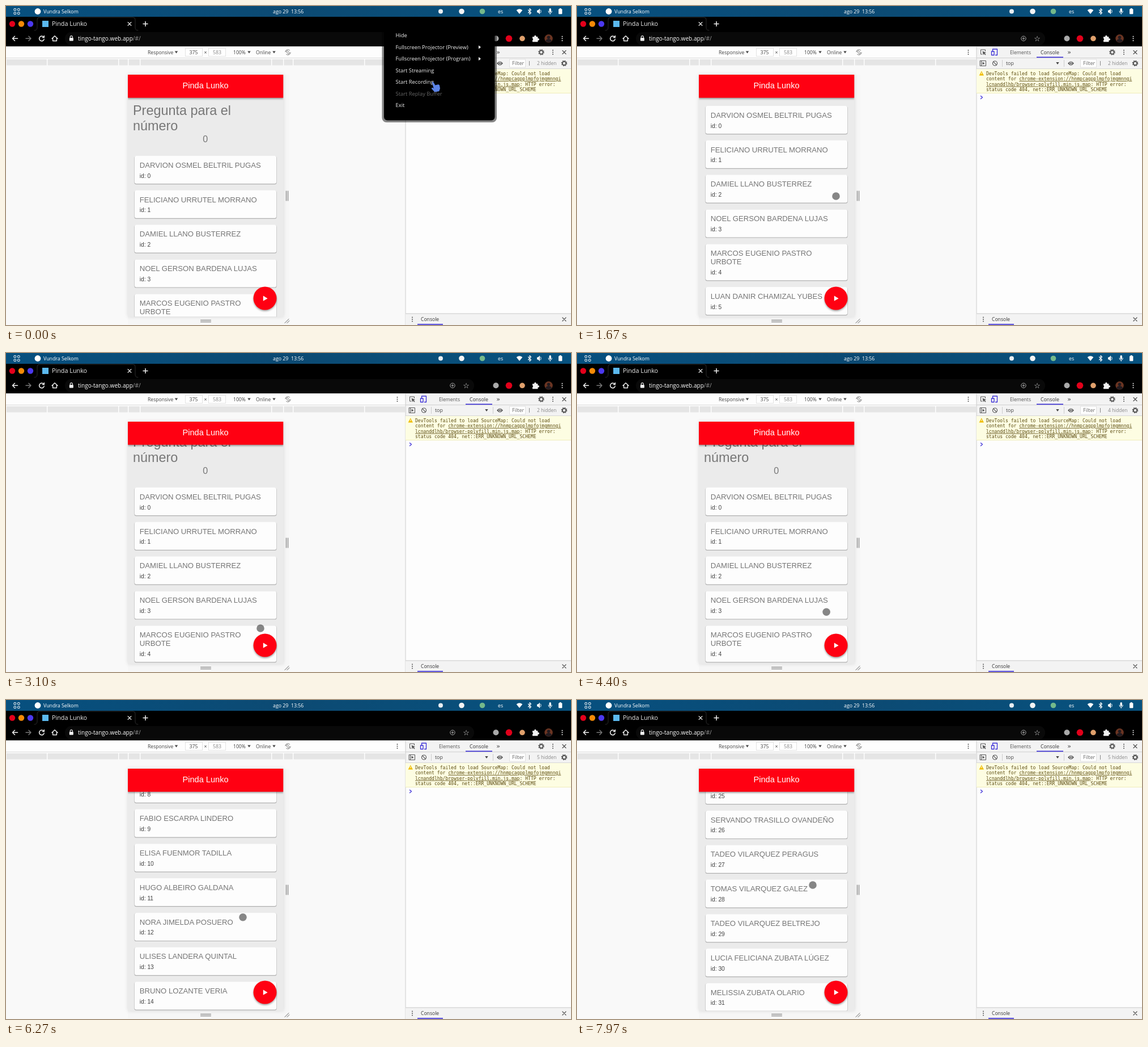
Write an HTML page that moves like this. It is 997 by 562 pixels and loops after 8000 ms.

```html
<!DOCTYPE html>
<html lang="es">
<head>
<meta charset="utf-8">
<style>
  html, body { margin: 0; width: 100%; height: 100%; overflow: hidden; background: #fdfdfd; }
  svg { display: block; width: 997px; height: 562px; }
  text { font-family: "Open Sans", "Noto Sans", sans-serif; white-space: pre; }
  .app text { font-family: "Liberation Sans", Arial, sans-serif; }
  .mono text { font-family: "DejaVu Sans Mono", monospace; }
  .glyph { font-family: "DejaVu Sans", sans-serif; text-anchor: middle; dominant-baseline: central; }
  .line { fill: none; stroke-linecap: round; stroke-linejoin: round; }
</style>
</head>
<body>
<svg id="stage" viewBox="0 0 997 562"></svg>
<script>
const LOOP = 8000;
const text = (x, y, size, str, fill, attrs = '') =>
  `<text x="${x}" y="${y}" font-size="${size}" fill="${fill}" ${attrs}>${str}</text>`;
const glyph = (x, y, size, str, fill) => text(x, y, size, str, fill, 'class="glyph"');
const rect = (x, y, w, h, fill, attrs = '') =>
  `<rect x="${x}" y="${y}" width="${w}" height="${h}" fill="${fill}" ${attrs}/>`;
const dot = (x, y, r, fill, attrs = '') => `<circle cx="${x}" cy="${y}" r="${r}" fill="${fill}" ${attrs}/>`;
const path = (d, fill) => `<path d="${d}" fill="${fill}"/>`;
const line = (d, stroke, width = 1) => `<path class="line" d="${d}" stroke="${stroke}" stroke-width="${width}"/>`;
const caret = (x, y, fill = '#444') => path(`M${x - 2.7} ${y - 2}h5.4l-2.7 4z`, fill);
const dots = (x, y, fill) => [-3.6, 0, 3.6].map(d => dot(x, y + d, 1, fill)).join('');
const cross = (x, y, r, stroke) =>
  line(`M${x - r} ${y - r}l${2 * r} ${2 * r}m0 ${-2 * r}l${-2 * r} ${2 * r}`, stroke, 1.3);
const gear = (x, y) => dot(x, y, 3.2, 'none', 'stroke="#555" stroke-width="2"') +
  dot(x, y, 4.7, 'none', 'stroke="#555" stroke-width="1.3" stroke-dasharray="1.85 1.84"');

// ---- Player list -------------------------------------------------------
const names = [
  'DARVION OSMEL BELTRIL PUGAS', 'FELICIANO URRUTEL MORRANO', 'DAMIEL LLANO BUSTERREZ',
  'NOEL GERSON BARDENA LUJAS', 'MARCOS EUGENIO PASTRO|URBOTE', 'LUAN DANIR CHAMIZAL YUBES',
  'RAUL FERMIN CÁRBOL BERMIO', 'EDIVER MELGADE VILÁRQUEZ', 'OLIVIA DORANTE MESUL',
  'FABIO ESCARPA LINDERO', 'ELISA FUENMOR TADILLA', 'HUGO ALBEIRO GALDANA',
  'NORA JIMELDA POSUERO', 'ULISES LANDERA QUINTAL', 'BRUNO LOZANTE VERIA',
  'IRENE MARULO CIFUELA', 'TOBIAS MESANZA ROLDUN', 'CAMILA MOLGUERA DIAL',
  'RUBEN NOVARTE OLIVAL', 'FLORENTINA UZA BALMÍREZ', 'LUAN PEDRO TAMARIZ TAMARIZ',
  'ERNESTO BELTREJO MANTUYA', 'LUAN PEDRO RIZO MARDENA', 'SHEIDRY SALOBRIA FERRUELA',
  'TOMAS PEPULANDA SALTUAR', 'LUISA FERNELIA TOBARES LEDÓN', 'SERVANDO TRASILLO OVANDEÑO',
  'TADEO VILARQUEZ PERAGUS', 'TOMAS VILARQUEZ GALEZ', 'TADEO VILARQUEZ BELTREJO',
  'LUCIA FELICIANA ZUBATA LÚGEZ', 'MELISSIA ZUBATA OLARIO'
];
const PITCH = 60.8, LINE = 15.1;

function playerCards() {
  let top = 264;
  return names.map((name, id) => {
    const lines = name.split('|'), extra = (lines.length - 1) * LINE, height = 49 + extra;
    const card = rect(226.5, top + .4, 251, height + .8, '#000', 'rx="3.2" opacity=".25"') +
      rect(227, top, 250, height, '#fdfdfd', 'rx="3"') +
      lines.map((s, i) => text(235.8, top + 20.7 + i * LINE, 13.15, s, '#757575')).join('') +
      text(235.8, top + 38.5 + extra, 10.23, 'id: ' + id, '#404040');
    top += PITCH + extra;
    return card;
  }).join('');
}

// ---- Static parts ------------------------------------------------------
function systemBar() {
  const squares = [[14, 4.5], [20.5, 4.5], [14, 11], [20.5, 11]]
    .map(([x, y]) => rect(x, y, 3.6, 3.6, 'none', 'stroke="#fff" rx=".8"')).join('');
  return rect(0, 0, 997, 19, 'url(#bar)') + squares + dot(56, 9.5, 5.4, '#fff') +
    text(66, 12.6, 8.8, 'Vundra Selkom', '#fff') +
    text(471, 12.6, 8.8, 'ago 29\u00a0\u00a013:56', '#fff') +
    dot(767, 9.5, 4, '#e8eef2') + dot(804, 9.5, 4.8, '#f4f4f4') + dot(840.5, 9.5, 4.8, '#74b98b') +
    text(868, 12.6, 8.8, 'es', '#fff') +
    path('M900.7 7.5Q906 3 911.3 7.5L906 14z', '#fff') +
    line('M921.5 7l5 5-2.5 2.5v-10l2.5 2.5-5 5', '#fff', 1.1) +
    path('M937 7.6h2l3-3v10l-3-3h-2z', '#fff') + line('M943.5 7q1.5 2.5 0 5', '#fff') +
    rect(958.5, 4, 3.4, 7, '#fff', 'rx="1.7"') + line('M957 9q0 3.5 3.2 3.5t3.2-3.5M960.2 12.5v2', '#fff') +
    rect(975, 5.3, 6.4, 9, '#fff', 'rx="1"') + rect(976.8, 4, 2.8, 2, '#fff');
}

function browserBar() {
  const W = '#f2f2f2';
  return rect(0, 19, 997, 52.5, '#000') +
    line('M50 43q5 0 5-5V24q0-4 4-4h165q4 0 4 4v14q0 5 5 5', '#2b2b2b') +
    dot(11, 31.5, 5.2, '#e5001b') + dot(27, 31.5, 5.2, '#f58a07') + dot(43, 31.5, 5.2, '#4b38f0') +
    rect(64, 26, 11, 11, '#5bb8ee') + text(81, 35.2, 10.8, 'Pinda Lunko', '#eee') +
    cross(218, 31.5, 2.9, W) + line('M242 31.5h8M246 27.5v8', W, 1.5) +
    rect(104, 46, 722, 23, '#090909', 'rx="11"') +
    line('M20.5 57.3h-9m4-4l-4 4 4 4', W, 1.5) + line('M35 57.3h9m-4-4l4 4-4 4', '#777', 1.5) +
    line('M66.2 54.5a4.3 4.3 0 1 0 1 3.8M67.3 52.5v3h-3', W, 1.5) +
    line('M81 57.5l5-4.8 5 4.8M82.6 56.5v5h6.8v-5', W, 1.4) +
    rect(111.8, 56, 7, 5.4, W, 'rx="1"') + line('M113.3 56v-1.4a2 2 0 0 1 4 0V56', W, 1.1) +
    text(127, 60.8, 10.05, 'tingo-tango.web.app<tspan fill="#999">/#/</tspan>', '#fff') +
    dot(788, 57.3, 4.2, 'none', 'stroke="#aaa"') + line('M786 57.3h4m-2-2v4', '#aaa') +
    glyph(812, 57, 13, '☆', '#eee') +
    dot(864.5, 57.3, 5, '#aaa') + dot(887.5, 57.3, 5.8, '#e2001a') + dot(911, 57.3, 4.8, '#e0a06c') +
    path('M929 54.2h3.2a1.8 1.8 0 1 1 3.4 0h2.9v3a1.8 1.8 0 1 1 0 3.3v2.7h-9.5v-3a1.8 1.8 0 0 0 0-3.3z', W) +
    dot(957.5, 57.3, 7.2, '#6b3522') + path('M952 62q1-4 5.5-4t5.5 4q-5 4-11 0z', '#211b20') +
    dot(957.5, 55.3, 2.7, '#211b20') + dots(981.5, 57.3, W);
}

function deviceArea() {
  const ticks = [72, 198, 215, 236, 468, 489, 506, 632].map(x => rect(x, 93, 1.4, 12, '#fff')).join('');
  const D = '#444';
  return rect(0, 71.5, 705, 490.5, '#f9f9f9') + rect(0, 71.5, 705, 19.5, '#fdfdfd') +
    rect(0, 91, 705, 1, '#ddd') + rect(1, 94, 703, 10.5, '#e5e5e5') + ticks +
    text(250, 84.8, 8.6, 'Responsive', D) + caret(300.5, 81.5) +
    rect(316.5, 74.5, 30, 14, '#fff', 'stroke="#e2e2e2"') + text(323.5, 84.8, 8.8, '375', D) +
    text(349.5, 84.8, 8.8, '×', D) +
    rect(357.5, 74.5, 30, 14, '#fff', 'stroke="#e2e2e2"') + text(365, 84.8, 8.8, '583', '#888') +
    text(401, 84.8, 8.6, '100%', D) + caret(429, 81.5) +
    text(441, 84.8, 8.6, 'Online', D) + caret(473, 81.5) +
    dot(497.5, 81.5, 4.6, 'none', 'stroke="#777" stroke-dasharray="10.5 4"') +
    line('M494.6 80l1.6-1.6 4.2 4.4-1.6 1.6z', '#666') + dots(690.5, 81.5, '#555') +
    rect(489.5, 121, 10, 440, '#f6f6f6') + rect(215, 547.5, 284, 13.5, '#f6f6f6') +
    line('M494.5 326v17M497.5 326v17M343.5 553.5h18M343.5 556.5h18M492 558.5l7-7M496 558.5l4-4', '#666');
}

function devTools() {
  const D = '#444', M = '#5c4b10';
  const log = ['DevTools failed to load SourceMap: Could not load',
    'content for <tspan text-decoration="underline">chrome-extension://hnmpcagpplmpfojmgmnngi</tspan>',
    '<tspan text-decoration="underline">lcnanddlhb/browser-polyfill.min.js.map</tspan>: HTTP error:',
    'status code 404, net::ERR_UNKNOWN_URL_SCHEME'];
  return rect(704.5, 71.5, 292.5, 490.5, '#fdfdfd') + rect(705, 71.5, 292, 39, '#f3f3f3') +
    rect(705, 91, 292, 1, '#d0d0d0') + rect(705, 110, 292, 1, '#d8d8d8') + rect(704.5, 71.5, 1, 490.5, '#ccc') +
    line('M715 85h-2.5v-8h8v2.5', '#555') + path('M715.5 79.5l6.5 2.7-2.6 1 2.2 2.4-1.1 1-2.3-2.4-1.2 2.3z', '#555') +
    line('M733.5 80v-4h8v10.5h-3M731.5 80h4.5v6.5h-4.5z', '#3c30d8', 1.3) +
    text(764, 84.8, 8.6, 'Elements', '#555') + text(818, 84.8, 8.8, 'Console', '#333') +
    rect(811, 89.5, 47, 1.6, '#3c30d8') + glyph(868.5, 81, 11, '»', D) +
    gear(944.5, 81.5) + dots(965, 81.5, '#555') + cross(985, 81.5, 3, '#555') +
    line('M711.5 96.5h10v9h-10zM713.5 96.5v9', '#555') + path('M715.5 98.5l4 2.5-4 2.5z', '#555') +
    dot(737.5, 101, 4, 'none', 'stroke="#555" stroke-width="1.2"') + line('M734.8 98.2l5.4 5.6', '#555', 1.2) +
    rect(750, 95, 1, 12, '#ccc') + text(757, 104.3, 8.8, 'top', D) + caret(848, 101) +
    rect(859, 95, 1, 12, '#ccc') +
    path('M866 101q5.5-7 11 0-5.5 7-11 0z', '#555') + dot(871.5, 101, 2.4, '#f3f3f3') + dot(871.5, 101, 1.4, '#555') +
    rect(888.5, 94, 28, 14, '#fff', 'stroke="#e0e0e0"') + text(893, 104.3, 9, 'Filter', '#666') +
    rect(923, 97, 1, 8, '#888') +
    text(937, 104.3, 8.4, '<tspan id="hidden">2</tspan> hidden', '#888') + gear(985, 101) +
    rect(705, 111, 292, 42, '#fdfde2') + rect(705, 153, 292, 1, '#f0eebb') +
    path('M713.8 114.5l4.2 8h-8.4z', '#f0bd00') + rect(713.3, 117, 1, 3, '#fff') +
    `<g class="mono">${log.map((s, i) => text(722, 121.7 + i * 9.5, 8.07, s, M)).join('')}</g>` +
    line('M712.5 158.5l3 2.5-3 2.5', '#3c30d8', 1.3) +
    rect(705, 541.5, 292, 20.5, '#f3f3f3') + rect(705, 541.5, 292, 1, '#ccc') +
    dots(717, 552, '#555') + text(732, 555.3, 8.6, 'Console', '#333') +
    rect(726, 560, 45, 1.6, '#3c30d8') + cross(985, 552, 3, '#555');
}

function phone() {
  return `<g class="app">${rect(215, 121, 274.5, 426.5, '#ebebeb', 'filter="url(#halo)"')}
    <g clip-path="url(#screen)">
      <g id="list">
        ${text(224, 192, 23.4, 'Pregunta para el', '#777')}${text(224, 219, 23.4, 'número', '#777')}
        ${text(351.7, 239.7, 16.1, '0', '#777', 'text-anchor="middle"')}
        ${playerCards()}
      </g>
      <g filter="url(#shadow)">${rect(215, 121, 274.5, 40.7, '#ff0012')}</g>
      ${text(352, 145.3, 14.6, 'Pinda Lunko', '#fff', 'text-anchor="middle"')}
      <g filter="url(#shadow)">${dot(457, 515, 20.5, '#ff0012')}</g>
      ${path('M453.8 510.6v9.2l7.8-4.6z', '#fff')}
    </g></g>`;
}

function menu() {
  const items = ['Hide', 'Fullscreen Projector (Preview)', 'Fullscreen Projector (Program)',
    'Start Streaming', 'Start Recording', 'Start Replay Buffer', 'Exit'];
  return `<g id="menu">${rect(663.5, 28, 202.5, 177, '#000', 'rx="8" opacity=".47"')}
    ${rect(667, 28, 195.5, 173.5, '#000', 'rx="6"')}
    ${items.map((s, i) => text(687.5, 55.3 + i * 20.5, 9.4, s, i === 5 ? '#666' : '#f0f0f0')).join('')}
    ${path('M834 69.5v6l4-3zM834 90v6l4-3z', '#fff')}</g>`;
}

const hand = path('M751.5 134.5q1.8-1.6 3.3.6l2.6 4.4 5-1.3q2-.3 2.6 1.6l1 5.5-1.7 5-8 1.2-5.3-5.8q-.4-2 1.7-1.7l2 1z', '#5b83e6');

document.getElementById('stage').innerHTML = `<defs>
    <linearGradient id="bar"><stop stop-color="#07507f"/><stop offset=".5" stop-color="#0c4a73"/><stop offset="1" stop-color="#07527f"/></linearGradient>
    <clipPath id="screen">${rect(215, 121, 274.5, 426.5, '#000')}</clipPath>
    <filter id="shadow" x="-20%" y="-20%" width="140%" height="150%" color-interpolation-filters="sRGB"><feDropShadow dx="0" dy="2" stdDeviation="1.6" flood-opacity=".35"/></filter>
    <filter id="halo" color-interpolation-filters="sRGB"><feDropShadow dx="0" dy="0" stdDeviation="3" flood-opacity=".12"/></filter>
  </defs>` + systemBar() + browserBar() + deviceArea() + phone() + devTools() + menu() +
  `<g id="hand">${hand}</g>` + dot(0, 0, 6.8, '#000', 'id="touch" opacity=".47"');

// ---- Motion ------------------------------------------------------------
// Keys are [time, ...values]; scroll segments starting at a "fling" time slow down to their end.
const pointerKeys = [[0, 757, 142], [200, 757, 142], [800, 520, 400], [1100, 457, 423], [1600, 457, 335],
  [1750, 457, 335], [2230, 438, 505], [2600, 440, 502], [3100, 449, 485], [4200, 449, 485], [4900, 418, 385],
  [5150, 418, 385], [5400, 418, 195], [5700, 418, 195], [6050, 418, 400], [6250, 418, 400], [6500, 418, 195],
  [7300, 418, 195], [7970, 416, 326]];
const scrollKeys = [[0, 0], [1100, 0], [1600, 88], [1750, 88], [2230, 29], [2400, 27], [5150, 27], [5400, 217.6],
  [6250, 617], [6500, 817], [7000, 1262.3], [7900, 1665]];
const fling = [2230, 5400, 7000];

function sample(keys, t) {
  const next = keys.findIndex(k => k[0] > t);
  if (next < 0) return keys[keys.length - 1].slice(1);
  const a = keys[next - 1], b = keys[next];
  let p = (t - a[0]) / (b[0] - a[0]);
  if (keys === scrollKeys && fling.includes(a[0])) p = 1 - (1 - p) ** 2;
  return a.slice(1).map((v, i) => v + (b[i + 1] - v) * p);
}

const part = Object.fromEntries(['list', 'menu', 'hand', 'touch', 'hidden']
  .map(id => [id, document.getElementById(id)]));

function draw(now) {
  const t = now % LOOP;
  const [x, y] = sample(pointerKeys, t), [scroll] = sample(scrollKeys, t);
  const onDevice = x < 500;
  part.list.setAttribute('transform', `translate(0 ${-scroll})`);
  part.menu.setAttribute('opacity', Math.max(0, Math.min(1, 1 - (t - 30) / 150)));
  part.hand.setAttribute('transform', `translate(${x - 757} ${y - 142})`);
  part.hand.setAttribute('visibility', onDevice ? 'hidden' : 'visible');
  part.touch.setAttribute('transform', `translate(${x} ${y})`);
  part.touch.setAttribute('visibility', onDevice ? 'visible' : 'hidden');
  part.hidden.textContent = 2 + [3600, 4000, 5650].filter(at => t >= at).length;
}

const start = performance.now();
(function frame() {
  draw(performance.now() - start);
  requestAnimationFrame(frame);
})();
</script>
</body>
</html>
```
